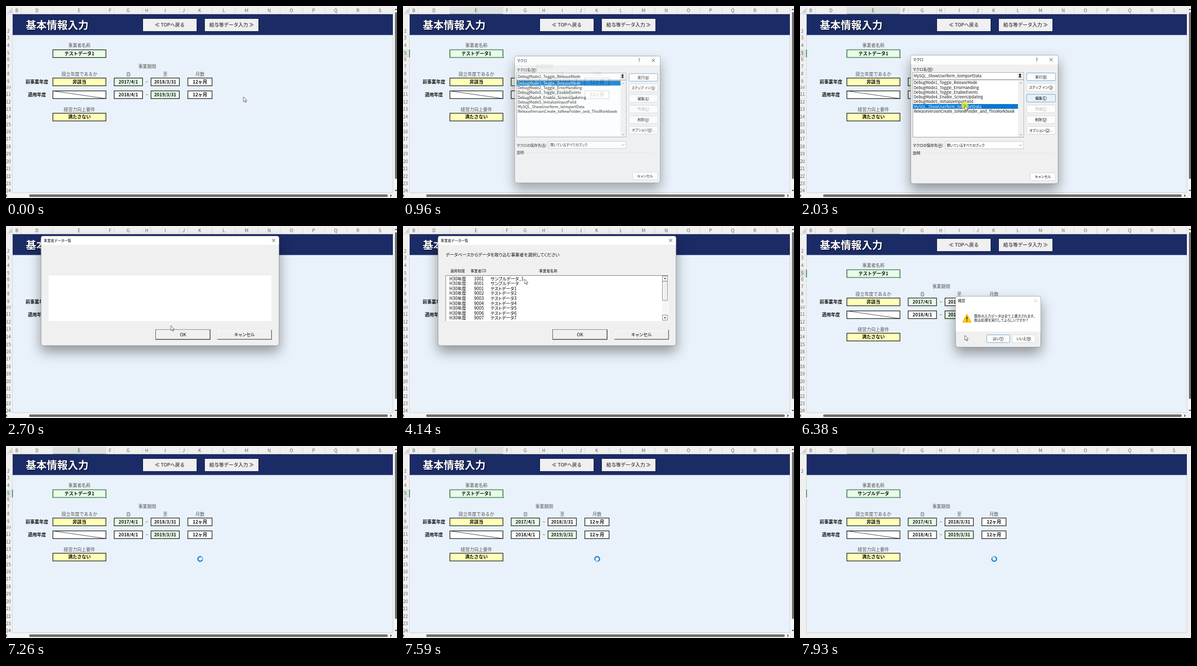
Recreate the animation shown at these times as an HTML page. Size 759 by 374 pixels, loop 8 s.

```html
<!DOCTYPE html>
<html lang="ja">
<head>
<meta charset="utf-8">
<style>
html, body { margin: 0; width: 100%; height: 100%; overflow: hidden; background: #f0f0f0; }
svg { display: block; width: 759px; height: 374px; }
text { font-family: "Noto Sans CJK JP", "Noto Sans CJK", sans-serif; white-space: pre; }
.win { transform-box: fill-box; transform-origin: center; filter: drop-shadow(0 12px 12px rgba(0,0,0,.38)); }
.win text { font-feature-settings: "palt"; }
#title { filter: drop-shadow(1.5px 1.5px 1px rgba(0,0,0,.7)); }
.key { filter: drop-shadow(.7px .7px .8px rgba(0,0,0,.5)); }
</style>
</head>
<body>
<svg id="stage" viewBox="0 0 759 374"></svg>
<script>
const GREEN = '#217346', BLUE = '#0078d7';
const rect = (x, y, w, h, fill, stroke = 'none', more = '') =>
  `<rect x="${x}" y="${y}" width="${w}" height="${h}" fill="${fill}" stroke="${stroke}" ${more}/>`;
const path = (d, stroke, fill = 'none', more = '') =>
  `<path d="${d}" stroke="${stroke}" fill="${fill}" ${more}/>`;
// y is the vertical centre of the line
const text = (x, y, s, size, fill = '#111', more = '') =>
  `<text x="${x}" y="${y + size * .37}" font-size="${size}" fill="${fill}" ${more}>${s}</text>`;
const mid = (x, y, s, size, fill, more = '') =>
  text(x, y, s, size, fill, 'text-anchor="middle" ' + more);
const group = (id, body, more = '') => `<g id="${id}" ${more}>${body}</g>`;
const key = c => `(<tspan text-decoration="underline">${c}</tspan>)`;
const cross = (x, y, color) => path(`M${x - 3} ${y - 3}l6 6m0 -6l-6 6`, color, 'none', 'stroke-width=".9"');
const arrow = (x, y, dx, dy, color, r = 3) => // small triangle pointing along dx, dy
  path(`M${x + dx * r} ${y + dy * r}L${x - dy * r} ${y - dx * r}L${x + dy * r} ${y + dx * r}Z`, 'none', color);

function sheet() {
  const cols = 'B21 D60 E142 F202 G237 H273 I309 J345 K376 L423 M467 N511 O554 P597 Q640 R683 S726'.split(' ');
  const edges = [12.5, 29.5, 91, 194, 210, 265, 281, 337, 353, 400, 445, 489, 532, 576, 619, 662, 705, 751];
  const rows = [62, 77, 92, 104, 118, 132, 147, 158, 172, 187, 201, 216, 231, 245, 259, 274, 288, 303, 317, 332, 346, 360];
  const cell = (x, y, w, s, fill = '#fff', id = '') =>
    rect(x, y + .4, w, 15, fill, '#222', 'stroke-width="1.3"') +
    mid(x + w / 2, y + 7.5, s, 8.8, '#111', `font-weight="700" id="${id}"`);
  const label = (x, y, s) => mid(x, y, s, 8.7, '#555');
  const head = (x, y, s) => mid(x, y, s, 8.8, '#111', 'font-weight="700"');
  const button = (x, s) => rect(x, 25, 104, 24, '#f0f0f0', 'none', 'class="key"') +
    mid(x + 52, 37, s, 9.4, '#111', 'font-weight="500"');

  return rect(0, 0, 759, 374, '#f0f0f0') +
    rect(13, 56, 738, 307.5, '#e9f2fa') +
    path('M13 363.5H751V56', '#c4c8cc', 'none', 'stroke-width=".7"') +
    rect(13, 16, 738, 40.5, '#1b2b66') +
    path('M3 13.5H11.5V4Z', 'none', '#d0d0d0') +
    path(edges.map(x => `M${x} 2V15`).join(''), '#d4d4d4', 'none', 'stroke-width=".8"') +
    path('M0 15.5H751M12.5 15V363', '#c4c4c4', 'none', 'stroke-width=".6"') +
    group('colSel', rect(91, 2, 103, 13.5, '#e0e0e0') + rect(91, 15, 103, 1, '#6f9a84')) +
    group('rowMark', rect(12, 85, 1.3, 15, GREEN)) +
    cols.map(c => mid(+c.slice(1), 8.5, c[0], 9, '#666', c[0] === 'E' ? 'id="colE"' : '')).join('') +
    mid(4.5, 49, 2, 8.8, '#666') +
    group('chrome',
      group('rowSel', rect(0, 85, 12, 15, '#e0e0e0')) +
      '<clipPath id="clip10"><rect y="155.5" width="13" height="6"/></clipPath>' +
      rows.map((y, i) => mid(4.5, y, i + 3, 8.8, '#666', i === 7 ? 'clip-path="url(#clip10)"' : i === 2 ? 'id="row5"' : '')).join('') +
      path('M0 56.5H12M0 67H12M0 85H12M0 100H12M0 108H12M0 125H12M0 140H12M0 155H12M0 164H12M0 180H12', '#d8d8d8', 'none', 'stroke-width=".5"') +
      text(38.5, 37, '基本情報入力', 20.3, '#fff', 'font-weight="900" id="title"') +
      button(266, '≪ TOPへ戻る') + button(386, '給与等データ入力 ≫') +
      rect(752, 2, 7, 362, '#f4f4f4') + rect(0, 365, 751, 9, '#f4f4f4') +
      rect(755, 12, 4, 325, '#6e6e6e', 'none', 'rx="2"') +
      rect(45, 367, 696, 5, '#6e6e6e', 'none', 'rx="2"') +
      arrow(757, 8, 0, -1, '#555') + arrow(757, 358, 0, 1, '#555') +
      arrow(2, 369.5, -1, 0, '#555') + arrow(746, 369.5, 1, 0, '#555')) +
    label(142.5, 77, '事業者名称') + label(142.5, 132.5, '設立年度であるか') + label(142.5, 201.5, '経営力向上要件') +
    label(274, 118, '事業期間') + label(237.5, 132.5, '自') + label(309, 132.5, '至') + label(376.5, 132.5, '月数') +
    head(60, 147.5, '前事業年度') + head(60, 172.5, '適用年度') +
    cell(91, 85, 103, 'テストデータ1', '#e6ffe6', 'client') +
    cell(91, 140, 103, '非該当', '#ffffb8') + cell(91, 208.5, 103, '満たさない', '#ffffb8') +
    cell(91, 165, 103, '') + path('M91 165.4l103 15', '#222', 'none', 'stroke-width=".8"') +
    cell(210, 140, 55, '2017/4/1', '#e6ffe6') + cell(281.5, 140, 55, '2018/3/31') + cell(353, 140, 47, '12ヶ月') +
    cell(210, 165, 55, '2018/4/1') + cell(281.5, 165, 55, '2019/3/31', '#e6ffe6') + cell(353, 165, 47, '12ヶ月') +
    mid(273.5, 148, '~', 8.7, '#333') + mid(273.5, 173, '~', 8.7, '#333') +
    group('cellSel', rect(91, 85.4, 103, 15, 'none', '#5b9a77', 'stroke-width="1.4"') +
      rect(192.5, 98.7, 3, 3, GREEN, '#fff', 'stroke-width=".5"'));
}

const frame = (x, y, w, h, bar, barFill = '#fff') =>
  rect(x, y, w, h, '#f0f0f0', '#8a8a8a', 'rx="4" stroke-width=".8"') +
  path(`M${x + .4} ${y + bar}V${y + 4}q0 -3.6 3.6 -3.6H${x + w - 4}q3.6 0 3.6 3.6V${y + bar}Z`, 'none', barFill);
const push = (x, y, w, h, s, on, off, id = '') =>
  rect(x, y, w, h, '#fdfdfd', on ? '#4a97d8' : '#d0d0d0', `rx="1.5" stroke-width=".8" id="${id}"`) +
  mid(x + w / 2, y + h / 2, s, 6.9, off ? '#a5a5a5' : '#111');

const macros = ['DebugMode1_Toggle_ReleaseMode', 'DebugMode2_Toggle_ErrorHandling', 'DebugMode3_Toggle_EnableEvents',
  'DebugMode4_Enable_ScreenUpdating', 'DebugMode5_InitializeInputField', 'MySQL_ShowUserform_toImportData',
  'ReleaseVersionCreate_toNewFolder_and_ThisWorkbook'];

function macroDialog() {
  return frame(215, 96, 286, 250, 18) +
    text(219.5, 104.5, 'マクロ', 7.2) + mid(459.5, 104.5, '?', 8.5) + cross(487.5, 104.5, '#222') +
    text(219, 123, `マクロ名${key('M')}:`, 7.3) +
    rect(219, 129.5, 215, 13.5, '#fff', '#999', 'stroke-width=".8"') +
    text(221, 136, '', 7.45, '#111', 'id="macroName"') +
    rect(421, 131, 12, 11, '#f0f0f0') + arrow(427, 134.5, 0, -1, '#111') + rect(425.8, 134, 2.4, 4.5, '#111') + rect(424, 138, 6, 1, '#111') +
    rect(219, 144, 215, 111.5, '#fff', '#888', 'stroke-width=".8"') +
    rect(423, 144.5, 10.6, 110.5, '#f0f0f0') + arrow(428.5, 151, 0, -1, '#aaa', 2.5) + arrow(428.5, 250, 0, 1, '#aaa', 2.5) +
    rect(219.5, 191, 203.5, 9.2, BLUE, '#c87000', 'stroke-width=".5" stroke-dasharray="1" id="macroBar"') +
    macros.map((s, i) => text(221, 149.5 + i * 9.25, s, 7.45, '#111', 'class="macro"')).join('') +
    push(440, 130.5, 56, 15, '実行' + key('R'), true) +
    push(440, 151, 56, 15, 'ステップ イン' + key('S')) +
    push(440, 172, 56, 15, '編集' + key('E'), false, false, 'edit') +
    push(440, 193, 56, 15, '作成' + key('C'), false, true) +
    push(440, 214, 56, 15, '削除' + key('D')) +
    push(440, 234.5, 56, 15, 'オプション' + key('O') + '...') +
    text(219, 271.5, `マクロの保存先${key('A')}:`, 7.2) +
    rect(282, 264, 152, 14, '#fff', '#bbb', 'stroke-width=".8"') + text(285, 271.3, '開いているすべてのブック', 6.7) +
    path('M425.5 270l2.5 2.5l2.5 -2.5', '#666', 'none', 'stroke-width=".8"') +
    text(219, 286, '説明', 7.2) + path('M236 286H490', '#dedede', 'none', 'stroke-width=".7"') +
    push(447, 325, 49, 15, 'キャンセル');
}

function listForm() {
  const bevel = (x, y, s, edge) => rect(x, y, 106, 19, '#f0f0f0', edge, 'stroke-width=".9"') +
    path(`M${x + .5} ${y + 18.6}h105v-18`, '#555', 'none', 'stroke-width="1.2"') +
    path(`M${x + 1} ${y + 17.5}v-16.5h103`, '#fff') + mid(x + 53, y + 9.7, s, 8.8);
  const scrollKey = (y, h) => rect(503.5, y, 10, h, '#f0f0f0', '#777', 'stroke-width=".8"') +
    path(`M504.5 ${y + h - 1}v${2 - h}h8`, '#fff', 'none', 'stroke-width=".8"');
  const row = i => {
    const y = 102.5 + i * 9.6;
    const code = [1001, 8001][i] || 8999 + i;
    const name = ['サンプルデータ_1', 'サンプルデータ'][i] || 'テストデータ' + (i - 1);
    return `<g ${i === 1 ? 'id="pick"' : ''}>` + [H30, code, name].map((s, k) => text([90, 138, 170][k], y, s, 8.5, '')).join('') + '</g>';
  };
  const H30 = 'H30年度';
  return frame(68, 19.5, 462, 213.5, 17) +
    text(73, 28, '事業者データ一覧', 6.9) + cross(519.5, 28, '#222') +
    rect(83, 96.5, 432, 88.5, '#fff') +
    group('formBody',
      text(83, 56, 'データベースからデータを取り込む事業者を選択してください', 8.45) +
      text(92, 87.5, '適用制度', 7.1) + text(131, 87.5, '事業者CD', 7.1) + text(264, 87.5, '事業者名称', 7.2) +
      path('M83 185V96.5H515', '#777', 'none', 'stroke-width=".9"') +
      rect(83.5, 107.6, 420, 9.3, BLUE, 'none', 'id="pickBar"') +
      [0, 1, 2, 3, 4, 5, 6, 7, 8].map(row).join('') +
      rect(503, 97, 11, 87.5, '#f5f5f5') + scrollKey(97.5, 10) + scrollKey(108, 37) + scrollKey(173.5, 10) +
      arrow(508.5, 103, 0, -1, '#111', 2) + arrow(508.5, 178, 0, 1, '#111', 2)) +
    bevel(290.5, 202, 'OK', '#444') + bevel(410, 202, 'キャンセル', '#ddd');
}

function confirmBox() {
  return frame(302, 137, 165.5, 99, 68.5) +
    text(306.5, 145.5, '確認', 7) + cross(457.5, 145.5, '#bbb') +
    path('M324 172L332 187.5H316Z', '#f5b800', '#ffcb14', 'stroke-width="1.5" stroke-linejoin="round"') +
    rect(323.2, 176.5, 1.7, 6, '#222') + rect(323.2, 184, 1.7, 1.7, '#222') +
    text(338, 175.3, '既存の入力データは全て上書きされます。', 6.7) +
    text(338, 184, '取込処理を実行してよろしいですか？', 6.7) +
    push(362.5, 212, 44.5, 15, `はい${key('Y')}`, true) + push(412, 212, 45, 15, `いいえ${key('N')}`);
}

document.getElementById('stage').innerHTML = sheet() +
  group('macroWin', macroDialog(), 'class="win"') +
  group('formWin', listForm(), 'class="win"') +
  group('askWin', confirmBox(), 'class="win"') +
  '<circle id="ring" r="7" fill="#ecec14" opacity=".75"/>' +
  group('pointer', path('M0 0V9.6L2.3 7.6L3.9 11L5.3 10.4L3.8 7.1H6.8Z', '#444', '#fff', 'stroke-width=".8"')) +
  group('spinner', '<circle r="4.5" fill="#fff" stroke="#1683dc" stroke-width="2.4"/>' +
    path('M0 -4.5A4.5 4.5 0 0 1 4.5 0', '#8fd0ff', 'none', 'stroke-width="2.4"'));

const $ = id => document.getElementById(id);
const show = (id, on) => $(id).setAttribute('visibility', on ? 'inherit' : 'hidden');
const within = (t, ...spans) => spans.some(([a, b]) => t >= a && t < b);
const clamp = v => Math.max(0, Math.min(1, v));

// time, x, y
const track = [[1220, 461, 177], [1490, 320, 194], [3170, 320, 194], [3930, 239, 113], [4000, 239, 113],
  [4210, 235, 100], [4470, 235, 100], [4740, 235, 107], [5220, 235, 107], [5550, 291.5, 197], [5970, 320, 209],
  [6130, 320, 209], [6330, 320, 213], [6400, 320, 213], [6640, 373, 218], [6920, 373, 218], [6990, 377, 220]];

function pointerAt(t) {
  const i = track.findIndex(k => k[0] > t);
  if (i === 0) return track[0].slice(1);
  if (i < 0) return track[track.length - 1].slice(1);
  const [a, x, y] = track[i - 1], [b, u, v] = track[i];
  const p = clamp((t - a) / (b - a)), e = p * p * (3 - 2 * p);
  return [x + (u - x) * e, y + (v - y) * e];
}

function showWindow(id, t, open, close) {
  const p = Math.min(clamp((t - open) / 130 + .3), 1 - clamp((t - close) / 130));
  show(id, t >= open && p > 0);
  $(id).style.opacity = p;
  $(id).style.transform = `scale(${.92 + .08 * p})`;
}

function draw(t) {
  const active = within(t, [350, 2510], [6200, 8000]);
  for (const id of ['colSel', 'rowSel', 'rowMark', 'cellSel']) show(id, active);
  for (const id of ['colE', 'row5']) $(id).setAttribute('fill', active ? GREEN : '#666');
  show('chrome', t < 7860);
  $('client').textContent = t < 7860 ? 'テストデータ1' : 'サンプルデータ';

  showWindow('macroWin', t, 890, 2300);
  showWindow('formWin', t, 2510, 6130);
  showWindow('askWin', t, 6260, 6720);

  const choice = t < 1690 ? 0 : 5;
  $('macroName').textContent = macros[choice];
  $('macroBar').setAttribute('y', 144.8 + choice * 9.25);
  document.querySelectorAll('.macro').forEach((m, i) => m.setAttribute('fill', i === choice ? '#fff' : '#111'));
  $('edit').setAttribute('stroke', t < 1220 ? '#d0d0d0' : '#4a97d8');
  $('edit').setAttribute('fill', t < 1220 ? '#fdfdfd' : '#e8f1f9');

  const picked = t >= 4880;
  show('formBody', t >= 2760);
  show('pickBar', picked);
  $('pick').setAttribute('fill', picked ? '#fff' : '#111');

  const [x, y] = pointerAt(t), place = `translate(${x} ${y})`;
  $('ring').setAttribute('transform', place);
  $('pointer').setAttribute('transform', place);
  $('spinner').setAttribute('transform', `${place} rotate(${t * .4})`);
  show('ring', within(t, [1690, 2240], [4880, 5010], [6060, 6130], [6650, 6720]));
  show('pointer', within(t, [0, 350], [1220, 7260]));
  show('spinner', t >= 7260);
}

function loop(now) {
  draw(now % 8000);
  requestAnimationFrame(loop);
}
draw(0);
requestAnimationFrame(loop);
</script>
</body>
</html>
```
